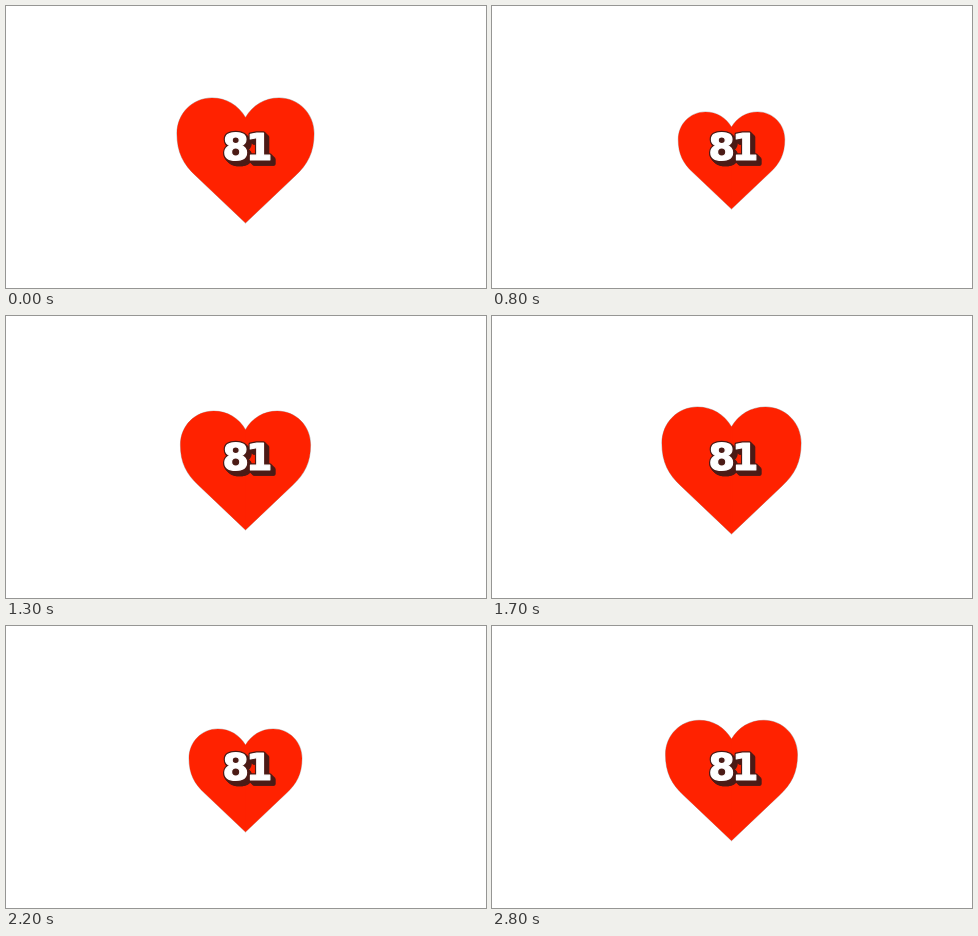
These frames come from a looping animation (480x282 px, 2.9 s). An HTML page with a canvas:

```html
<!DOCTYPE html>
<html lang="en">
<head>
<meta charset="utf-8">
<title>Beating heart</title>
<style>
  html, body { margin: 0; width: 100%; height: 100%; overflow: hidden; background: #fff; }
  canvas { display: block; }
</style>
</head>
<body>
<canvas id="stage" width="480" height="282"></canvas>
<script>
const ctx = document.getElementById('stage').getContext('2d');
const LOOP = 2900, STEP = 100;
const BEAT = 1465, PEAK = 170;
const MAX_WIDTH = 139.5, FALLOFF = 8.3e-5;
const CENTER = { x: 239.5, y: 154.5 };

// Width drops with the square of the time to the nearest peak, like a bounce.
function heartWidth(t) {
  const offset = t - PEAK;
  const d = offset - BEAT * Math.round(offset / BEAT);
  return MAX_WIDTH - FALLOFF * d * d;
}

// The path is 137 wide and 125 high around the origin.
function heartPath() {
  const path = new Path2D();
  path.moveTo(0, -43);
  for (const side of [-1, 1]) {
    path.moveTo(0, -43);
    path.bezierCurveTo(side * 7, -55, side * 19, -62.5, side * 33.5, -62.5);
    path.bezierCurveTo(side * 53, -62.5, side * 68.5, -47, side * 68.5, -27);
    path.bezierCurveTo(side * 68.5, -8, side * 62, 4, side * 49.5, 15.5);
    path.lineTo(0, 62.5);
  }
  return path;
}

const heart = heartPath();

function drawHeart(width) {
  const scale = width / 137;
  ctx.save();
  ctx.translate(CENTER.x, CENTER.y);
  ctx.scale(scale, scale);
  ctx.lineWidth = 0.7;
  ctx.strokeStyle = 'rgba(70, 50, 50, 0.5)';
  ctx.stroke(heart);
  ctx.fillStyle = '#ff2200';
  ctx.fill(heart);
  ctx.fillRect(-0.5, -42, 1, 103);
  ctx.restore();
}

function drawText(color, x, y, outline) {
  ctx.fillStyle = ctx.strokeStyle = color;
  ctx.lineWidth = outline;
  ctx.strokeText('81', x, y);
  ctx.fillText('81', x, y);
}

function drawNumber() {
  ctx.font = 'bold 38px "DejaVu Sans", sans-serif';
  ctx.letterSpacing = '-3px';
  ctx.lineJoin = 'round';
  const x = 216.6, y = 154;
  for (let i = 4; i >= 0; i -= 0.5) drawText('#4c1c17', x + i, y + i, 3.6);
  drawText('#fff', x, y, 1.2);
}

function draw() {
  const t = Math.floor((performance.now() % LOOP) / STEP) * STEP;
  ctx.fillStyle = '#fff';
  ctx.fillRect(0, 0, 480, 282);
  drawHeart(heartWidth(t));
  drawNumber();
  requestAnimationFrame(draw);
}

draw();
</script>
</body>
</html>
```
